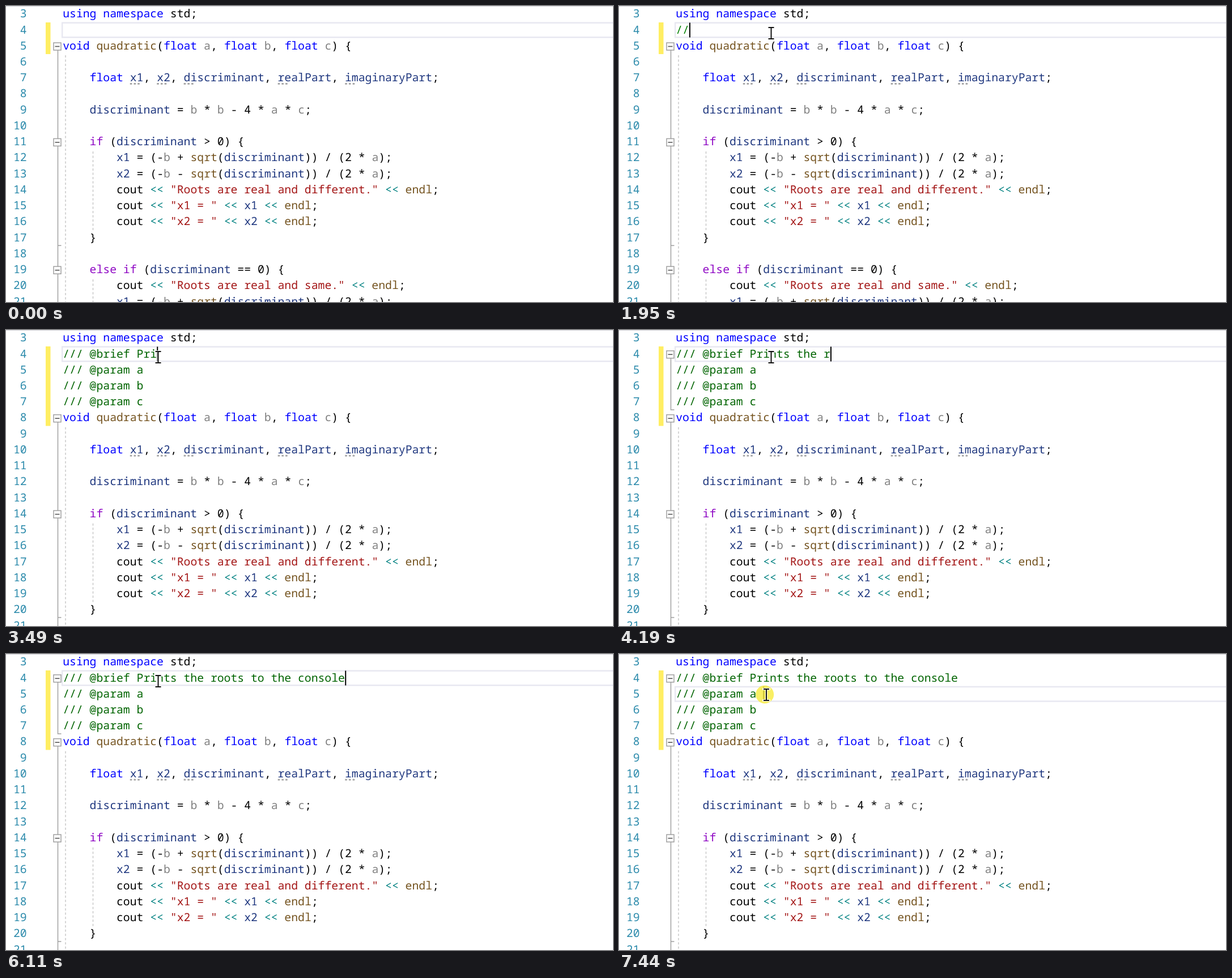
Animation, 1071 px wide and 523 px high, one loop 7990 ms. Source, as an HTML page:

```html
<!DOCTYPE html>
<html lang="en">
<head>
<meta charset="utf-8">
<title>Documenting a function</title>
<style>
  html, body { margin: 0; width: 100%; height: 100%; overflow: hidden; background: #fff; }
  svg { display: block; width: 1071px; height: 523px; }
  text { font: 19.76px "Noto Sans Mono", "DejaVu Sans Mono", monospace; white-space: pre;
         text-rendering: geometricPrecision; font-variant-ligatures: none; }
  .num { fill: #2b8aab; text-anchor: end; }
  .guide { stroke: #c4c4c4; stroke-width: 1.4; stroke-dasharray: 4 3.5; }
  .fold { stroke: #a0a0a0; stroke-width: 1.5; fill: none; }
  .minus { stroke: #555; stroke-width: 1.6; }
</style>
</head>
<body>
<svg id="stage" viewBox="0 0 1071 523"></svg>
<script>
const LOOP = 7990, LEFT = 100.2, CHAR = 11.857, ROW = 28.235, BLINK = 540;
const BRIEF = '/// @brief Prints the roots to the console';

const body = `void quadratic(float a, float b, float c) {

    float x1, x2, discriminant, realPart, imaginaryPart;

    discriminant = b * b - 4 * a * c;

    if (discriminant > 0) {
        x1 = (-b + sqrt(discriminant)) / (2 * a);
        x2 = (-b - sqrt(discriminant)) / (2 * a);
        cout << "Roots are real and different." << endl;
        cout << "x1 = " << x1 << endl;
        cout << "x2 = " << x2 << endl;
    }

    else if (discriminant == 0) {
        cout << "Roots are real and same." << endl;
        x1 = (-b + sqrt(discriminant)) / (2 * a);`.split('\n');

const palette = {
  '#0000ff': /^(using|namespace|void|float)$/,
  '#8f08c4': /^(if|else)$/,
  '#74531f': /^(quadratic|sqrt|endl)$/,
  '#808080': /^[abc]$/,
  '#1f377f': /^(x1|x2|discriminant|realPart|imaginaryPart)$/,
  '#008080': /^<<$/,
  '#a31515': /^"/
};

// Typing: [time, caret column]
const keys = [
  [1100, 0], [1780, 1], [1950, 2], [2170, 11], [3190, 12], [3410, 13], [3490, 14],
  [3570, 15], [3650, 16], [3730, 17], [3810, 18], [3880, 19], [3960, 20], [4110, 21],
  [4190, 23], [4340, 24], [4420, 25], [4490, 26], [4570, 27], [4640, 28], [4790, 29],
  [4880, 30], [5030, 31], [5110, 32], [5190, 33], [5340, 35], [5570, 36], [5650, 38],
  [5800, 39], [5880, 40], [6030, 41], [6110, 42]
];
const EXPAND = 2170, FOLD = 3730, CLICK = 1010, RELEASE = 1240, CLICK2 = 7360;

const stage = document.getElementById('stage');
const rowTop = n => (n - 3) * ROW;
const colX = c => LEFT + c * CHAR;

function add(parent, tag, attrs = {}, text) {
  const el = document.createElementNS('http://www.w3.org/2000/svg', tag);
  for (const k in attrs) el.setAttribute(k, attrs[k]);
  if (text !== undefined) el.textContent = text;
  return parent.appendChild(el);
}
const group = (parent = stage) => add(parent, 'g');
const path = (parent, cls, d) => add(parent, 'path', { class: cls, d });
const line = (parent, n, text, fill = '#000') =>
  add(parent, 'text', { x: LEFT, y: rowTop(n) + 20.3, fill }, text);

function codeLine(parent, n, src) {
  const el = line(parent, n, '');
  for (const tok of src.match(/"[^"]*"|\w+|<<|\s+|./g) || []) {
    const fill = Object.keys(palette).find(k => palette[k].test(tok)) || '#000';
    add(el, 'tspan', { fill }, tok);
  }
}

function foldBox(parent, n) {
  const y = rowTop(n) + 15;
  add(parent, 'rect', { x: 84, y: y - 6.5, width: 13, height: 13, class: 'fold', style: 'fill:#fff' });
  path(parent, 'minus', `M86.5 ${y}h8`);
}

const show = (el, on) => el.setAttribute('visibility', on ? 'visible' : 'hidden');
const move = (el, x, y) => el.setAttribute('transform', `translate(${x} ${y})`);

// Fixed parts
add(stage, 'rect', { width: 1071, height: 523, fill: '#fff' });
add(stage, 'rect', { width: 1071, height: 1, fill: '#d2d2d6' });
const current = add(stage, 'rect', {
  x: 99.2, y: 29.7, width: 990, height: 25.6, fill: '#fff', stroke: '#e8e8f1', 'stroke-width': 2.5
});
const changed = add(stage, 'rect', { x: 70, y: 29, width: 8.5, height: 56, fill: '#ffee62' });
for (let n = 3; n <= 21; n++) add(stage, 'text', { x: 36.6, y: rowTop(n) + 20.3, class: 'num' }, n);
codeLine(stage, 3, 'using namespace std;');

// Function, pushed down by the comment block
const code = group();
path(code, 'guide', 'M105 87V523M153.5 257V397M153.5 483V523');
path(code, 'fold', 'M91.5 78V530M91.5 423.3h6');
[5, 11, 19].forEach(n => foldBox(code, n));
body.forEach((src, i) => codeLine(code, i + 5, src));
for (const m of body[2].matchAll(/x1|x2|disc|real|imag/g))
  for (let i = 0; i < 3; i++)
    add(code, 'rect', { x: colX(m.index) + i * 6.7, y: 136, width: 3.6, height: 2.8, fill: '#a4a4a4' });

// Comment block
const brief = line(stage, 4, '', '#006400');
const params = group();
['a', 'b', 'c'].forEach((p, i) => line(params, 5 + i, '/// @param ' + p, '#006400'));
const docFold = group();
path(docFold, 'fold', 'M91.5 49V141h6');
foldBox(docFold, 4);

const caret = add(stage, 'rect', { x: -1, y: 29.5, width: 2, height: 26, fill: '#000' });
const halo = add(stage, 'circle', { r: 16, fill: '#f8ec3c', opacity: 0.8 });
const mouse = group();
const beam = 'M-5 -10H5M0 -10V10M-5 10H5';
add(mouse, 'path', { d: beam, stroke: '#fff', 'stroke-width': 4, 'stroke-linecap': 'square', opacity: 0.85 });
add(mouse, 'path', { d: beam, stroke: '#111', 'stroke-width': 2 });

// Pointer progress in whole steps, 0 to 1
const stepped = (t, from, to, n) =>
  Math.min(n, Math.max(0, Math.floor((t - from) / (to - from) * n + 0.1))) / n;

function pointer(t) {
  if (t < 840) {
    const left = 1 - stepped(t, 70, 690, 8);
    return [268.5 + 570 * left ** 4, 49.5 + 399 * left ** 3];
  }
  const p = stepped(t, 6580, 7210, 8), s = p * p * (3 - 2 * p);
  return [268.5 - 8.5 * s, 48 + 24 * s];
}

function draw(t) {
  const expanded = t >= EXPAND, second = t >= CLICK2;
  const key = keys.filter(k => k[0] <= t).pop();
  const col = key ? key[1] : 0;

  brief.textContent = BRIEF.slice(0, col);
  brief.setAttribute('fill', expanded ? '#006400' : '#008000');
  show(params, expanded);
  show(docFold, t >= FOLD);
  move(code, 0, expanded ? 3 * ROW : 0);
  changed.setAttribute('height', expanded ? 140.5 : 56);

  move(current, 0, second ? ROW : 0);
  move(caret, colX(second ? 13 : col) + 1, second ? ROW : 0);
  show(caret, second || key && Math.floor((t - key[0]) / BLINK) % 2 === 0);

  const [x, y] = pointer(t);
  show(mouse, t >= 70);
  move(mouse, x, y);
  show(halo, second || (t >= CLICK && t < RELEASE));
  move(halo, x - 2.8, y - 0.5);
}

const start = performance.now();
function tick() {
  draw((performance.now() - start) % LOOP);
  requestAnimationFrame(tick);
}
draw(0);
requestAnimationFrame(tick);
</script>
</body>
</html>
```
